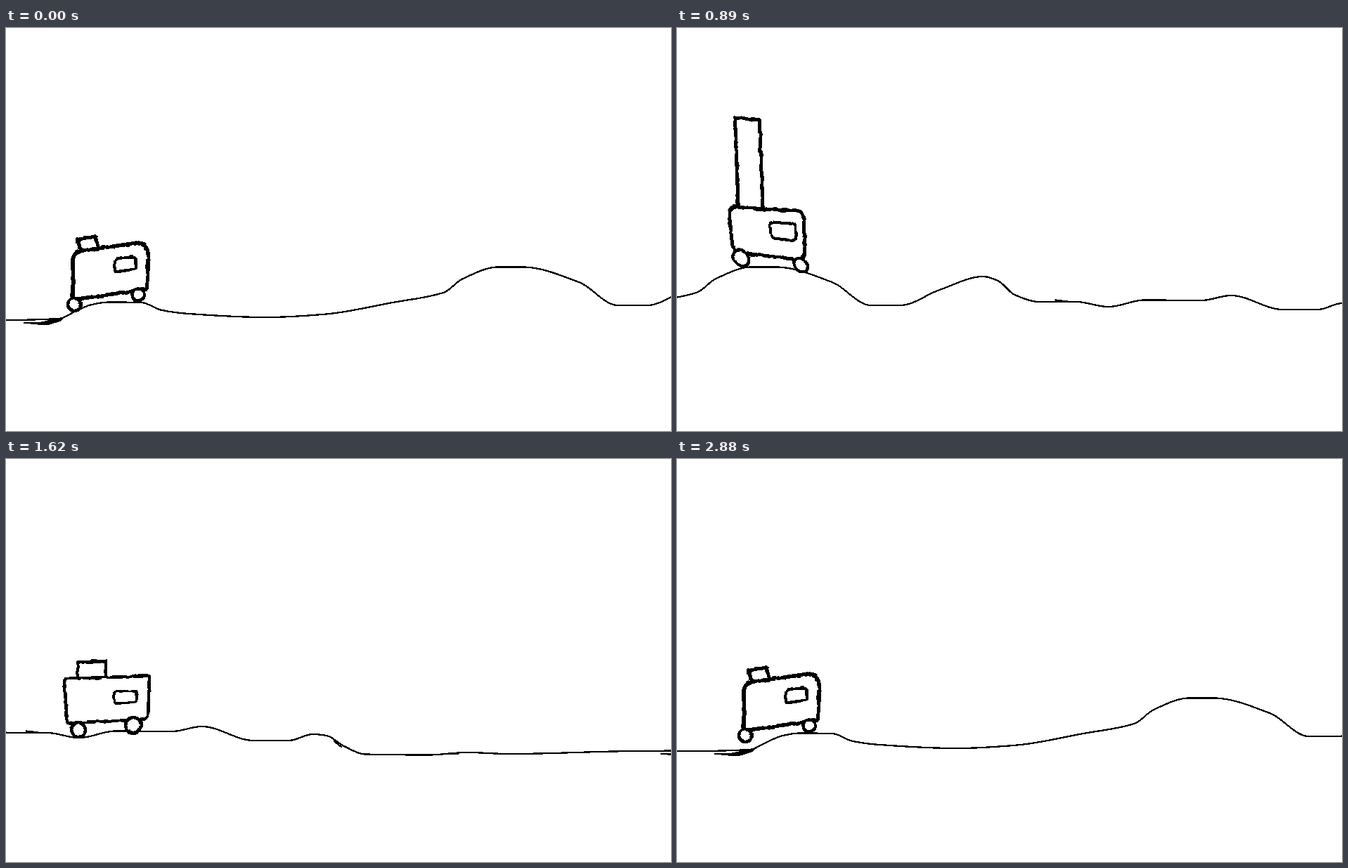
Recreate the animation shown at these times as an HTML page. Size 946 by 574 pixels, loop 2910 ms.

```html
<!DOCTYPE html>
<html lang="en">
<head>
<meta charset="utf-8">
<title>Bumpy ride</title>
<style>
  html, body { margin: 0; width: 100%; height: 100%; overflow: hidden; background: #fff; }
  svg { display: block; width: 100%; height: 100%; shape-rendering: crispEdges; }
  path, circle { fill: none; stroke: #000; stroke-linecap: round; stroke-linejoin: round; }
  #road path { stroke-width: 2.3; }
  #road .ink { fill: #000; stroke-width: 1; }
  #car circle { fill: #fff; }
</style>
</head>
<body>
<svg viewBox="0 0 946 574">
  <defs>
    <filter id="rough" filterUnits="userSpaceOnUse" x="0" y="0" width="946" height="574" color-interpolation-filters="sRGB">
      <feTurbulence type="fractalNoise" baseFrequency=".09" numOctaves="2" seed="4"/>
      <feDisplacementMap in="SourceGraphic" scale="3.5" xChannelSelector="R" yChannelSelector="G"/>
    </filter>
    <g id="road">
      <path id="ground"/>
      <path class="ink" d="M25 420L50 419L83 412L78 417L62 422L45 422Z"/>
      <path class="ink" d="M1660 421L1748 420L1693 422.5Z"/>
      <path d="M1571 402L1581 410M1133 387.5L1150 389.5"/>
    </g>
  </defs>
  <g id="scroller"><use href="#road" x="-2010"/><use href="#road"/><use href="#road" x="2010"/></g>
  <g filter="url(#rough)">
    <g id="car">
      <path id="body"/>
      <path id="chimney"/>
      <path id="pane"/>
      <circle id="rear"/>
      <circle id="front"/>
    </g>
  </g>
</svg>
<script>
const LOOP = 2910, STEPS = 71, ROAD = 2010;
const AXLES = [97, 188];
const $ = id => document.getElementById(id);
const set = (id, attrs) => {
  for (const name in attrs) $(id).setAttribute(name, attrs[name]);
};

// Blends numbers, and lists or objects of numbers.
function mix(a, b, u) {
  if (typeof a === 'number') return a + (b - a) * u;
  if (Array.isArray(a)) return a.map((v, i) => mix(v, b[i], u));
  return Object.fromEntries(Object.keys(a).map(name => [name, mix(a[name], b[name], u)]));
}

// Crests, dips and bends of the road.
const bends = `0,416 75,414 98,404 122,394 147,390.5 192,391 222,402 260,407 370,412
  450,408 550,391 622,377 650,357 700,340.5 735,340.5 815,362 870,395 912,395 968,373
  1030,354 1051,360 1075,380 1110,390 1162,390 1208,397 1260,387.5 1340,388 1383,381
  1456,401 1506,401 1541,392 1560,394 1585,409 1615,420.5 1705,421.5 1760,418 1820,420 2010,416`
  .split(/\s+/).map(p => p.split(',').map(Number));

const secant = i => (bends[i + 1][1] - bends[i][1]) / (bends[i + 1][0] - bends[i][0]);

// Slope that never overshoots: level at crests and dips, harmonic mean elsewhere.
const slopes = bends.map((_, i) => {
  if (i === 0 || i === bends.length - 1) return 0;
  const before = secant(i - 1), after = secant(i);
  return before * after > 0 ? 2 * before * after / (before + after) : 0;
});

function height(x) {
  x %= ROAD;
  const i = bends.findIndex((_, n) => x < bends[n + 1][0]);
  const [x0, y0] = bends[i], [x1, y1] = bends[i + 1];
  const w = x1 - x0, u = (x - x0) / w, v = 1 - u;
  return y0 * v * v * (1 + 2 * u) + y1 * u * u * (1 + 2 * v)
    + w * u * v * (slopes[i] * v - slopes[i + 1] * u);
}

let ground = `M0 ${height(0)}`;
for (let x = 4; x <= ROAD; x += 4) ground += `L${x} ${height(x)}`;
set('ground', { d: ground });

const scrolled = step => step * ROAD / STEPS;
const axleGround = step => AXLES.map(x => height(x + scrolled(step)));

// Corners run from bottom rear over the roof to bottom front.
const bus = {
  corners: [[95, 387], [95, 319], [203, 304], [201, 372]], radii: [3, 14, 22, 3], sag: 0,
  chimney: { x: 106, w: 25, h: 17, lean: -4 }, pane: { x: 170, y: 336, scale: 0.28 },
  rear: [97, 394, 9], front: [188, 380, 8.5], ink: 5.5, wheelInk: 4.5,
};
const tote = {
  corners: [[80, 385], [73, 322], [174, 299], [178, 369]], radii: [7, 10, 10, 12], sag: 0,
  chimney: { x: 87, w: 34, h: 41, lean: -6 }, pane: { x: 147, y: 336, scale: 0.36 },
  rear: [90, 392, 11], front: [172, 378, 9.5], ink: 5.2, wheelInk: 4.5,
};
const bean = {
  corners: [[79, 373], [73, 309], [214, 285], [208, 358]], radii: [33, 30, 28, 35], sag: 14,
  chimney: { x: 89, w: 40, h: 47, lean: 2 }, pane: { x: 176, y: 322, scale: 0.29 },
  rear: [99, 371, 11], front: [201, 360, 12], ink: 5, wheelInk: 3.5,
};
const box = {
  corners: [[87, 376], [83, 313], [204, 309], [202, 371]], radii: [2, 4, 2, 8], sag: 0,
  chimney: { x: 102, w: 40, h: 23, lean: 0 }, pane: { x: 170, y: 339, scale: 0.27 },
  rear: [103, 386, 10], front: [181, 379, 11], ink: 4.5, wheelInk: 4.5,
};
const fin = {
  corners: [[104, 374], [110, 312], [207, 268], [194, 369]], radii: [0, 38, 0, 0], sag: 0,
  chimney: { x: 150, w: 15, h: 0, lean: 0 }, pane: { x: 176, y: 324, scale: 0.28 },
  rear: [102, 385, 8.5], front: [190, 385, 9], ink: 4.5, wheelInk: 4,
};
const sail = {
  corners: [[109, 405], [157, 340], [204, 250], [191, 403]], radii: [0, 30, 0, 0], sag: 0,
  chimney: { x: 160, w: 8, h: 0, lean: 0 }, pane: { x: 175, y: 340, scale: 0.24 },
  rear: [101, 411, 7.5], front: [191, 408, 7.5], ink: 5.2, wheelInk: 4,
};

const stretch = (car, h) => ({ ...car, chimney: { ...car.chimney, h } });
const raiseTip = (car, lift) =>
  ({ ...car, corners: car.corners.map(([x, y], i) => [x, i === 2 ? y - lift : y]) });

// `drawnAt` is the step whose road fits the coordinates of the car.
const key = (step, car, drawnAt = step) => ({ step, pose: { ...car, road: axleGround(drawnAt) } });
const keys = [
  key(0, bus), key(14, tote), key(20, stretch(tote, 139), 14),
  key(27, bean), key(31, stretch(bean, 90), 27), key(39, box),
  key(47, fin), key(52, raiseTip(sail, 34), 58), key(58, sail),
  key(67, bus, 0), key(70, bus), key(71, bus, 0),
];

function towards([x0, y0], [x1, y1], distance) {
  const length = Math.hypot(x1 - x0, y1 - y0);
  const u = Math.min(distance / length, 0.5);
  return [x0 + (x1 - x0) * u, y0 + (y1 - y0) * u];
}

// Closed shape with rounded corners; the roof edge may sag.
function shell(corners, radii, sag) {
  return corners.map((corner, i) => {
    const start = towards(corner, corners[(i + 3) % 4], radii[i]);
    const end = towards(corner, corners[(i + 1) % 4], radii[i]);
    const mid = mix(corners[1], corners[2], 0.5);
    const edge = i === 0 ? `M${start}` : i === 2 ? `Q${mid[0]} ${mid[1] + sag} ${start}` : `L${start}`;
    return `${edge}Q${corner} ${end}`;
  }).join('') + 'Z';
}

function chimneyPath({ corners: [, [x0, y0], [x1, y1]], sag, chimney: { x, w, h, lean } }) {
  const roof = px => {
    const u = (px - x0) / (x1 - x0);
    return mix(y0, y1, u) + 2 * sag * u * (1 - u);
  };
  const left = roof(x), right = roof(x + w);
  return `M${x} ${left}L${x + lean} ${left - h}L${x + w + lean} ${right - h}L${x + w} ${right}`;
}

// The window is a small copy of the body.
function panePath({ corners, radii, sag, pane }) {
  const centre = [0, 1].map(axis => corners.reduce((sum, c) => sum + c[axis], 0) / 4);
  const small = corners.map(([x, y]) =>
    [pane.x + (x - centre[0]) * pane.scale, pane.y + (y - centre[1]) * pane.scale]);
  return shell(small, radii.map(r => r * pane.scale + 2), sag * pane.scale);
}

function draw(ms) {
  const step = Math.floor(ms / LOOP * STEPS);
  const next = keys.findIndex(k => k.step > step);
  const a = keys[next - 1], b = keys[next];
  const car = mix(a.pose, b.pose, (step - a.step) / (b.step - a.step));

  // Lift and tilt the car with the road under its axles.
  const [rearLift, frontLift] = axleGround(step).map((y, i) => y - car.road[i]);
  const tilt = (frontLift - rearLift) / (AXLES[1] - AXLES[0]);
  const wheel = ([cx, cy, r]) => ({ cx, cy, r, 'stroke-width': car.wheelInk });

  set('scroller', { transform: `translate(${-scrolled(step)} 0)` });
  set('car', { transform: `matrix(1 ${tilt} 0 1 0 ${rearLift - tilt * AXLES[0]})` });
  set('body', { d: shell(car.corners, car.radii, car.sag), 'stroke-width': car.ink });
  set('chimney', { d: chimneyPath(car), 'stroke-width': car.ink });
  set('pane', { d: panePath(car), 'stroke-width': car.ink * 0.8 });
  set('rear', wheel(car.rear));
  set('front', wheel(car.front));
}

const start = performance.now();
function tick() {
  draw((performance.now() - start) % LOOP);
  requestAnimationFrame(tick);
}
tick();
</script>
</body>
</html>
```
